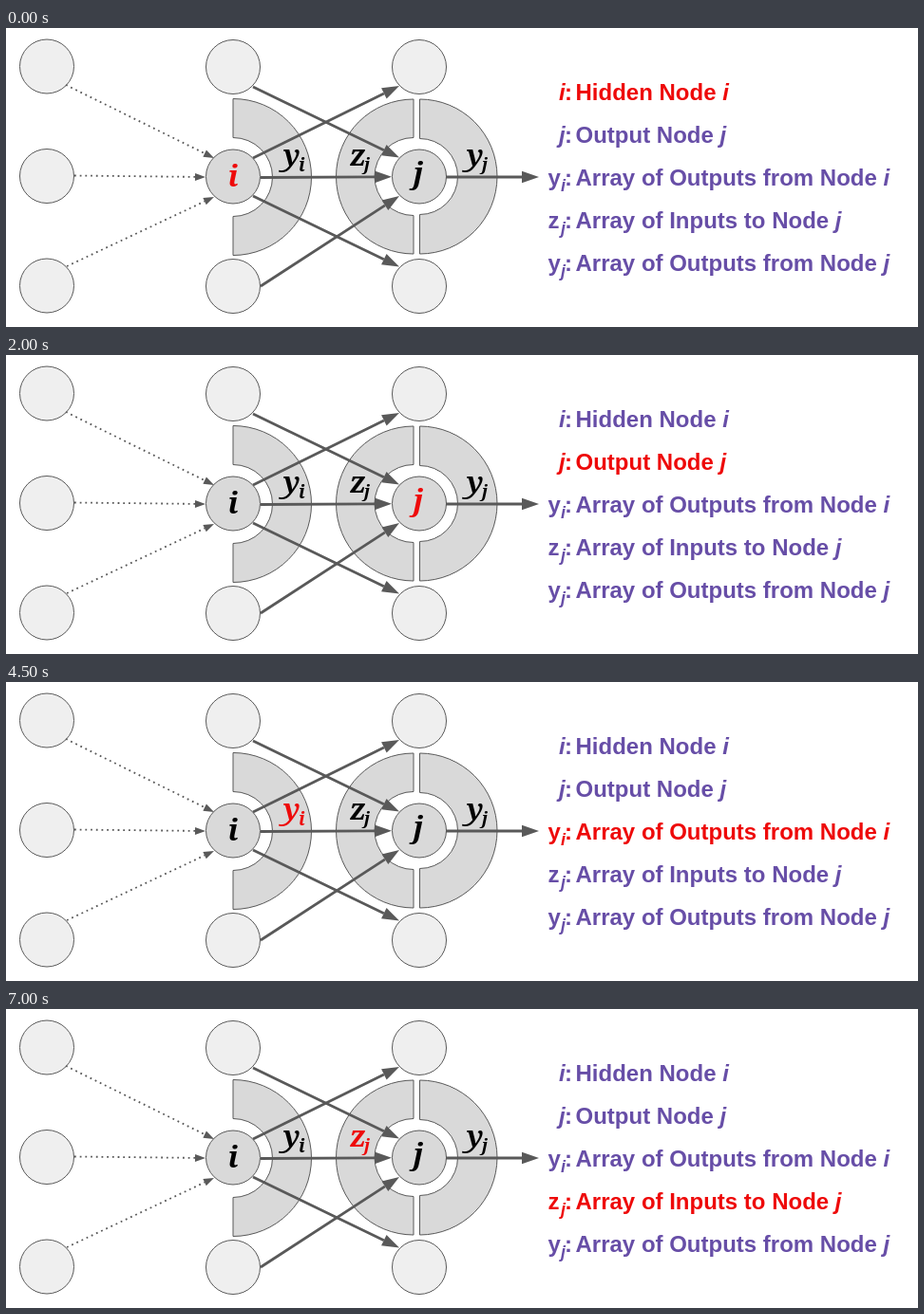
Animation of 960 by 315 pixels, one loop 8 s. Source, as an HTML page with a canvas:

```html
<!DOCTYPE html>
<html lang="en">
<head>
<meta charset="utf-8">
<style>
html, body { margin: 0; width: 100%; height: 100%; overflow: hidden; background: #fff; }
canvas { display: block; }
</style>
</head>
<body>
<canvas id="stage" width="960" height="315"></canvas>
<script>
const ctx = document.getElementById('stage').getContext('2d');
const LINE = '#595959', RING = '#d9d9d9', NODE = '#efefef';
const RED = '#ee0a0a', PURPLE = '#674ea7', BLACK = '#000';
const SANS = '"Liberation Sans", Arial, sans-serif';
const SERIF = '"Noto Serif", serif';
const LOOP = 8000;
const STEPS = [500, 3000, 5500];

const legend = [
  { symbol: 'i', text: 'Hidden Node ', node: 'i' },
  { symbol: 'j', text: 'Output Node ', node: 'j' },
  { symbol: 'y', sub: 'i', text: 'Array of Outputs from Node ', node: 'i' },
  { symbol: 'z', sub: 'j', text: 'Array of Inputs to Node ', node: 'j' },
  { symbol: 'y', sub: 'j', text: 'Array of Outputs from Node ', node: 'j' }
];

function outlined(fill) {
  ctx.fillStyle = fill;
  ctx.strokeStyle = LINE;
  ctx.lineWidth = 1;
  ctx.fill();
  ctx.stroke();
}

function circle(x, y, fill = NODE) {
  ctx.beginPath();
  ctx.arc(x, y, 28.5, 0, Math.PI * 2);
  outlined(fill);
}

function halfRing(x, y, outer, inner, left) {
  const top = -Math.PI / 2, bottom = Math.PI / 2;
  ctx.beginPath();
  ctx.arc(x, y, outer, top, bottom, left);
  ctx.arc(x, y, inner, bottom, top, !left);
  ctx.closePath();
  outlined(RING);
}

function arrow(x1, y1, x2, y2, dotted = false) {
  const head = dotted ? 11 : 18, half = dotted ? 4 : 6.3;
  const length = Math.hypot(x2 - x1, y2 - y1);
  ctx.save();
  ctx.translate(x1, y1);
  ctx.rotate(Math.atan2(y2 - y1, x2 - x1));
  ctx.strokeStyle = ctx.fillStyle = LINE;
  ctx.lineWidth = dotted ? 1.8 : 2.8;
  if (dotted) ctx.setLineDash([1.8, 3.9]);
  ctx.beginPath();
  ctx.moveTo(0, 0);
  ctx.lineTo(length - head, 0);
  ctx.stroke();
  ctx.beginPath();
  ctx.moveTo(length, 0);
  ctx.lineTo(length - head, -half);
  ctx.lineTo(length - head, half);
  ctx.fill();
  ctx.restore();
}

function write(text, x, y, size, family, color, italic = true) {
  ctx.font = `${italic ? 'italic ' : ''}bold ${size}px ${family}`;
  ctx.fillStyle = color;
  ctx.fillText(text, x, y);
  return x + ctx.measureText(text).width;
}

function drawNetwork() {
  halfRing(239, 157, 82.5, 41.5, false);
  halfRing(429, 156.5, 81.5, 41, true);
  halfRing(435.5, 156.5, 81.5, 40, false);
  [43, 239, 435].forEach((x, column) => {
    [41, 156.5, 272].forEach((y, row) => {
      circle(x, y - (column ? 0 : 0.5), column && row === 1 ? RING : NODE);
    });
  });
  arrow(63, 60, 219, 137, true);
  arrow(72, 155.5, 210, 157, true);
  arrow(64, 251, 219, 178, true);
  arrow(260, 62, 414, 136.5);
  arrow(260, 137, 414, 61);
  arrow(268, 157.5, 406, 156.8);
  arrow(260, 177, 414, 251.5);
  arrow(268, 272, 414, 177);
  arrow(463, 157, 561, 157);
}

function drawSymbols(active) {
  const tint = index => index === active ? RED : BLACK;
  ctx.textAlign = 'center';
  write('i', 239, 167, 31, SERIF, tint(0));
  write('j', 434, 164, 31, SERIF, tint(1));
  ctx.textAlign = 'left';
  write('y', 292, 145, 30, SERIF, tint(2));
  write('i', 308, 151, 19, SERIF, tint(2));
  write('z', 362, 145, 30, SERIF, tint(3));
  write('j', 377, 150, 18, SERIF, tint(3));
  write('y', 485, 145, 30, SERIF, tint(4));
  write('j', 501, 150, 18, SERIF, tint(4));
}

function drawLegend(active) {
  legend.forEach(({ symbol, sub, text, node }, index) => {
    const y = 76 + index * 45;
    const color = index === active ? RED : PURPLE;
    write(symbol, sub ? 570.5 : 582, y, 24, SANS, color, !sub);
    if (sub) write(sub, 584, y + 6, 18, SANS, color);
    write(':', 588, y, 24, SANS, color, false);
    const end = write(text, 599.5, y, 24, SANS, color, false);
    write(node, end, y, 24, SANS, color);
  });
}

function frame(now) {
  const time = now % LOOP;
  const active = STEPS.filter(start => time >= start).length;
  ctx.fillStyle = '#fff';
  ctx.fillRect(0, 0, 960, 315);
  drawNetwork();
  drawSymbols(active);
  drawLegend(active);
  requestAnimationFrame(frame);
}
requestAnimationFrame(frame);
</script>
</body>
</html>
```
